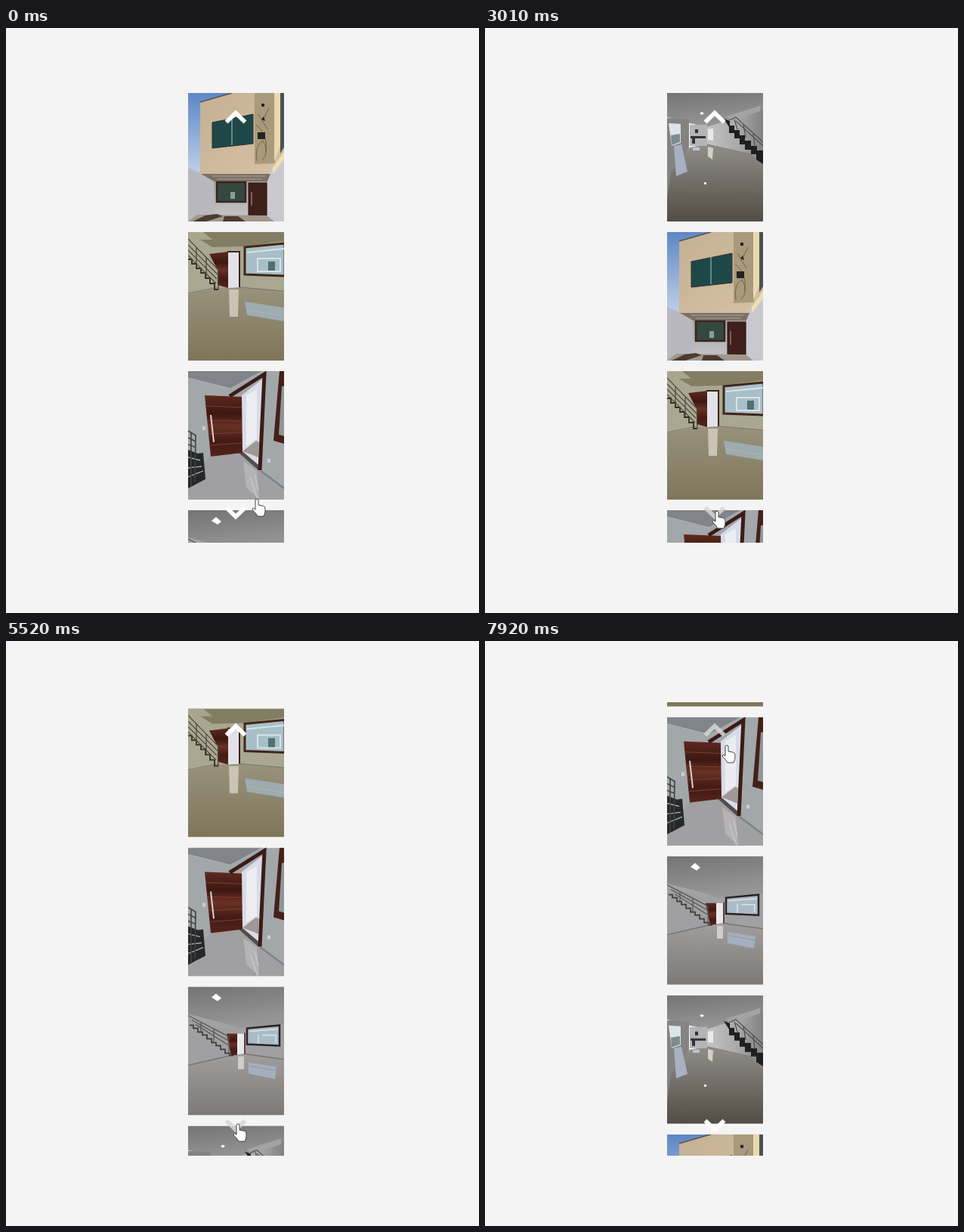
These frames come from a looping animation (626x774 px, 8000 ms). An HTML page:

```html
<!DOCTYPE html>
<html lang="en">
<head>
<meta charset="utf-8">
<title>Vertical carousel</title>
<style>
  html, body { margin: 0; height: 100%; overflow: hidden; background: #f4f4f4; }
  svg { display: block; width: 100vw; height: 100vh; }
  .arrow { fill: none; stroke: #fff; stroke-width: 5.6; }
  .arrow.hover { stroke: #d6d6d6; stroke-opacity: .85; }
</style>
</head>
<body>
<svg viewBox="0 0 626 774">
  <defs>
    <clipPath id="viewport"><rect x="241" y="81" width="127" height="600"/></clipPath>
    <clipPath id="photo"><rect width="127" height="170"/></clipPath>
    <linearGradient id="sky" x2="0" y2="1"><stop stop-color="#5d87c6"/><stop offset="1" stop-color="#c3d2e8"/></linearGradient>
    <linearGradient id="plaster" x2="1" y2="1"><stop stop-color="#c4b094"/><stop offset="1" stop-color="#d6c1a3"/></linearGradient>
    <linearGradient id="shade" x2="0" y2="1"><stop stop-color="#a5a2a3"/><stop offset="1" stop-color="#c3c2c6"/></linearGradient>
    <linearGradient id="oliveFloor" x2="0" y2="1"><stop stop-color="#98927c"/><stop offset="1" stop-color="#7f765a"/></linearGradient>
    <linearGradient id="ceiling" x2=".3" y2="1"><stop stop-color="#757475"/><stop offset="1" stop-color="#979697"/></linearGradient>
    <linearGradient id="greyFloor" x2="0" y2="1"><stop stop-color="#a09e9c"/><stop offset="1" stop-color="#7c7976"/></linearGradient>
    <linearGradient id="darkFloor" x2="0" y2="1"><stop stop-color="#918e88"/><stop offset=".5" stop-color="#716d66"/><stop offset="1" stop-color="#524e46"/></linearGradient>
    <linearGradient id="paleWall"><stop stop-color="#c3c3c5"/><stop offset=".55" stop-color="#a9a9aa"/><stop offset="1" stop-color="#818182"/></linearGradient>
    <linearGradient id="wood" x2="0" y2="1">
      <stop stop-color="#5e291f"/><stop offset=".3" stop-color="#3d1713"/><stop offset=".5" stop-color="#693124"/><stop offset=".75" stop-color="#431a15"/><stop offset="1" stop-color="#54241b"/>
    </linearGradient>
  </defs>

  <g clip-path="url(#viewport)">
    <!-- House front -->
    <g class="slide"><g clip-path="url(#photo)">
      <path fill="url(#sky)" d="M0 0h127v110H0z"/>
      <path fill="#b9b8be" d="M0 99l37 15v50l-37 6z"/>
      <path fill="url(#plaster)" d="M16 12L58 0h69v80l-18 27H16z"/>
      <path fill="none" stroke="#5a534d" stroke-width="1.5" d="M16 12L58 0"/>
      <path fill="#a99a7c" d="M88 0h27v93l-27 1z"/>
      <path fill="#ead9af" d="M114 0h8v70l-8 20z"/>
      <path fill="#4b5250" d="M122 0h5v72l-5 8z"/>
      <path fill="none" stroke="#6d634e" d="M91 90q-3-22 8-27q9 15-1 26M90 42q16 12 13 36M98 38l9-18M93 28l12 20"/>
      <path fill="#25231f" d="M92 52h10v9H92zM97 14h4v4h-4zM97 35l3-4 2 6z"/>
      <path fill="#1e4848" stroke="#302e2c" d="M32 39l54-11v39l-54 6z"/>
      <path stroke="#b4c5c2" d="M58 33v36"/>
      <path fill="#c9c8cf" d="M104 110l23-31v91h-27z"/>
      <path fill="#efdfb5" d="M112 99l15-21v10l-15 19z"/>
      <path fill="#7c7167" d="M17 107h92l-5 12H38z"/>
      <path stroke="#aaa094" d="M32 110h70M38 114h60"/>
      <path fill="url(#shade)" d="M34 117h71v46H34z"/>
      <path fill="#35483f" stroke="#3a241d" stroke-width="2.5" d="M38 118h38v26H38z"/>
      <path fill="#83a09d" d="M56 131h6v9h-6z"/>
      <path fill="#40201a" stroke="#2d1310" d="M80 119h24v43H80z"/>
      <path stroke="#aaa59e" d="M84 131v18"/>
      <path fill="#a2978c" d="M12 161l92 1 10 8H0z"/>
      <path fill="#4d3b31" d="M23 162l15-2 8 3-22 7H6zM48 163h18l10 7H46z"/>
    </g></g>

    <!-- Living room in warm light -->
    <g class="slide"><g clip-path="url(#photo)">
      <path fill="#a9a791" d="M0 0h127v90H0z"/>
      <path fill="#837d63" d="M0 0h127v12L73 19 32 20z"/>
      <path fill="#a9a58d" d="M0 0h20l12 10H8z"/>
      <path fill="url(#oliveFloor)" d="M0 82l40-8 30-1 57 5v92H0z"/>
      <path fill="none" stroke="#7b7662" d="M0 81l40-8M69 73l58 5"/>
      <path fill="url(#wood)" d="M28 29l25-3v48l-14-4V50z"/>
      <path fill="#e1e2e9" d="M53 27h14v46l-14 1z"/>
      <path stroke="#412218" stroke-width="2" d="M52 26h16v47" fill="none"/>
      <path fill="#a8bfc8" stroke="#402617" stroke-width="3" d="M75 20l53-5v43l-53-2z"/>
      <path fill="none" stroke="#d9e3e4" stroke-width="2" d="M78 27l49-5M92 35h30v17H92z"/>
      <path fill="#4e706f" d="M106 39h9v12h-9z"/>
      <path fill="none" stroke="#332e27" stroke-width="1.8" d="M0 36h5v6h6v6h6v6h6v7h6v7h6v8h5"/>
      <path fill="none" stroke="#4b463c" stroke-width="1.2" d="M0 9l40 41v26M0 17l39 39M0 24l38 38M0 31l37 37M11 20v26M24 34v26"/>
      <path fill="#c9c4b4" d="M54 76h13l-1 36H55z"/>
      <path fill="#9eabb0" d="M75 92l52 8v18l-49-8z"/>
      <path stroke="#b5b6a9" d="M78 103l49 8"/>
    </g></g>

    <!-- Open front door -->
    <g class="slide"><g clip-path="url(#photo)">
      <path fill="#a2a7a9" d="M0 0h127v170H0z"/>
      <path fill="#818488" d="M0 0h98L56 23 0 9z"/>
      <path stroke="#b0b4b5" fill="none" d="M0 9l56 14L98 0"/>
      <path fill="#a09fa2" d="M0 151l30-39 42-4 21 20 34 27v15H0z"/>
      <path fill="#dadbe8" d="M71 32l28-22-5 120-23-22z"/>
      <path fill="#ececf3" d="M77 32l14-8v66l-14 9z"/>
      <path fill="#a09894" d="M72 106l18-14 4 2-1 20z"/>
      <path fill="#514e4a" d="M67 108l6-1 20 17v7z"/>
      <path fill="url(#wood)" d="M22 32l49 2 1 74-42 5z"/>
      <path fill="none" stroke="#7b3f2d" d="M24 46l47 2M26 65l45 1M28 83l43-2M30 98l41-3"/>
      <path stroke="#d5d3d1" stroke-width="2" d="M30 58l4 36"/>
      <path fill="none" stroke="#3c1b16" stroke-width="5" d="M55 33l46-29-6 127"/>
      <path fill="#452019" d="M121 0h6v96l-14-4z"/>
      <path fill="#8d9795" d="M124 20h3v66l-7-2z"/>
      <path stroke="#7d8283" stroke-width="2.5" d="M96 132l31 23"/>
      <path fill="#25282a" d="M0 104l13 5 7-1 3 35-23 12z"/>
      <path fill="none" stroke="#a9aeae" stroke-width="1.3" d="M0 114l16 4M0 128l18-2M0 140l20-8"/>
      <path fill="none" stroke="#3f4347" stroke-width="1.6" d="M0 79l10 6-1 62M0 88l10 5M0 97l10 4M4 82v70"/>
      <path fill="#b5b3b7" d="M73 119l18 13 3 38-17-16z"/>
      <path stroke="#d2d0d4" d="M82 140l10 30M88 137l5 20"/>
      <path fill="#c9cecf" d="M105 116h4v5h-4zM19 73h4v5h-4z"/>
    </g></g>

    <!-- Room with stairs on the left -->
    <g class="slide"><g clip-path="url(#photo)">
      <path fill="#a09fa1" d="M0 0h127v110H0z"/>
      <path fill="url(#ceiling)" d="M0 0h127v49l-59 5L0 37z"/>
      <path fill="#a4a2a4" d="M0 36l54 14v5L0 42z"/>
      <path fill="#fff" d="M31 14l6-5 7 6-5 4z"/>
      <path fill="url(#greyFloor)" d="M0 105l56-13 19-3 52 7v74H0z"/>
      <path fill="none" stroke="#777574" stroke-width="1.5" d="M0 104l56-13M76 89l51 7"/>
      <path fill="url(#wood)" d="M51 62h15v28l-9 1z"/>
      <path fill="#e9e9ec" d="M65 62h9v26l-9 2z"/>
      <path stroke="#49271e" stroke-width="1.5" d="M75 61v28"/>
      <path fill="#a9bbc6" stroke="#2d2320" stroke-width="2.5" d="M78 55l43-4v27l-43-2z"/>
      <path fill="none" stroke="#dce3e7" stroke-width="1.5" d="M81 59l38-3M93 63v12M98 64h18v10"/>
      <path fill="none" stroke="#3e3a39" stroke-width="1.7" d="M2 51h5v4h6v5h6v4h6v5h6v5h6v4h6v5h6v5h6v3h5"/>
      <path fill="none" stroke="#575453" stroke-width="1.2" d="M0 38l54 28v24M5 44l48 27M10 50l43 27M17 47v14M34 56v18"/>
      <path fill="#d0cdca" d="M66 92h8v17h-8z"/>
      <path fill="#a5aebd" d="M80 100l37 6-2 16-35-7z"/>
      <path stroke="#8c99ac" d="M82 105l34 6"/>
    </g></g>

    <!-- Long room with stairs on the right -->
    <g class="slide"><g clip-path="url(#photo)">
      <path fill="url(#paleWall)" d="M53 0h74v120H53z"/>
      <path fill="url(#ceiling)" d="M0 0h127v21L53 45 30 40 0 32z"/>
      <path fill="#a4a3a3" d="M78 31l45-14v7L84 37z"/>
      <path fill="#fff" d="M43 27l3-2 3 2-3 2z"/>
      <path fill="#858381" d="M0 33l29 2v38L6 112l-6 40z"/>
      <path fill="url(#darkFloor)" d="M5 105l25-33 23-4 58 13 16 12v77H0v-30z"/>
      <path fill="#dce3eb" d="M2 40l16 1v25L6 70z"/>
      <path fill="#7b8c91" d="M5 56l12-2v11L6 69z"/>
      <path fill="#b3b4b7" d="M30 42h23v28H30z"/>
      <path fill="#333335" d="M31 57h20v3H37v7h-4v-7h-2zM37 48h4v5h-4z"/>
      <path fill="#e9e9e7" d="M54 48l7-1v16l-7-1z"/>
      <path stroke="#827e79" fill="none" d="M53 68l58 13"/>
      <path fill="#201f1f" d="M75 34l8 3v6h6v6h7v7h7v7h8v7h8v6h8v18l-9-6v-7h-7v-6h-8v-7h-7v-8h-7v-7h-7v-8z"/>
      <path fill="none" stroke="#55514e" stroke-width="1.3" d="M82 36l9-4 36 33M91 37l36 33M89 35l4 13M101 41l3 18M114 53l2 18"/>
      <path fill="#a7b1c2" d="M9 70l10-2 8 36-15 6z"/>
      <path fill="#bdc6d1" d="M34 72h9v4h-9z"/>
      <path fill="#d3d0c8" d="M54 71l7 2-1 15-6-4z"/>
      <path fill="#f4f4f0" d="M49 118h3v3h-3z"/>
    </g></g>
  </g>

  <path id="up" class="arrow" d="M291.500 124.500L304 112.500l12.500 12"/>
  <path id="down" class="arrow" d="M291.500 634.500L304 646.500l12.500-12"/>
  <path id="hand" fill="#fff" stroke="#444" stroke-linejoin="round"
    d="M-2 2a2 2 0 0 1 4 0v6l6.500 1.300q2.500 .7 2.500 3.700v3q0 3-2 7h-8q-2-4-6.500-8-1.500-2.500 1-2.700l2.500 2z"/>
</svg>
<script>
const LOOP = 8000, PITCH = 184, TOP = 86, GLIDE = 300;
const nextClicks = [700, 1270, 1944, 2560, 3350, 3980, 4400, 4620, 4840, 5060, 5274, 5650, 6050];
const prevClicks = [7400, 7894];
// time, x and y of the pointer tip
const pointerPath = [[0, 332, 623], [450, 307, 639], [6200, 307, 639], [6760, 334, 253], [7250, 320, 138], [LOOP, 320, 138]];

const slides = [...document.querySelectorAll('.slide')];
const [up, down, hand] = ['up', 'down', 'hand'].map(id => document.getElementById(id));
const clamp = v => Math.min(1, Math.max(0, v));
const mod = (a, n) => ((a % n) + n) % n;

// cubic-bezier(.25, .1, .25, 1)
function ease(x) {
  if (x <= 0 || x >= 1) return clamp(x);
  let lo = 0, hi = 1, s;
  for (let i = 0; i < 20; i++) {
    s = (lo + hi) / 2;
    const bx = .75 * s * (1 - s) + s ** 3;
    if (bx < x) lo = s; else hi = s;
  }
  return .3 * s * (1 - s) ** 2 + 3 * s * s * (1 - s) + s ** 3;
}

const travelled = (clicks, t) => clicks.reduce((sum, start) => sum + ease((t - start) / GLIDE), 0);

function pointerAt(t) {
  const i = pointerPath.findIndex(p => p[0] > t);
  const [t0, x0, y0] = pointerPath[i - 1], [t1, x1, y1] = pointerPath[i];
  const k = (t - t0) / (t1 - t0), s = k * k * (3 - 2 * k);
  return [x0 + (x1 - x0) * s, y0 + (y1 - y0) * s];
}

function draw(now) {
  const t = mod(now, LOOP);
  const position = travelled(nextClicks, t) - travelled(prevClicks, t);
  slides.forEach((slide, i) => {
    const y = mod(PITCH * (i - position + 1), PITCH * slides.length) - PITCH + TOP;
    slide.setAttribute('transform', `translate(241 ${y.toFixed(2)})`);
  });
  const [x, y] = pointerAt(t);
  hand.setAttribute('transform', `translate(${x} ${y})`);
  const over = centre => Math.abs(x - 304) < 22 && Math.abs(y - centre) < 23;
  up.classList.toggle('hover', over(118));
  down.classList.toggle('hover', over(640));
}

const start = performance.now();
function tick() {
  draw(performance.now() - start);
  requestAnimationFrame(tick);
}
tick();
</script>
</body>
</html>
```
